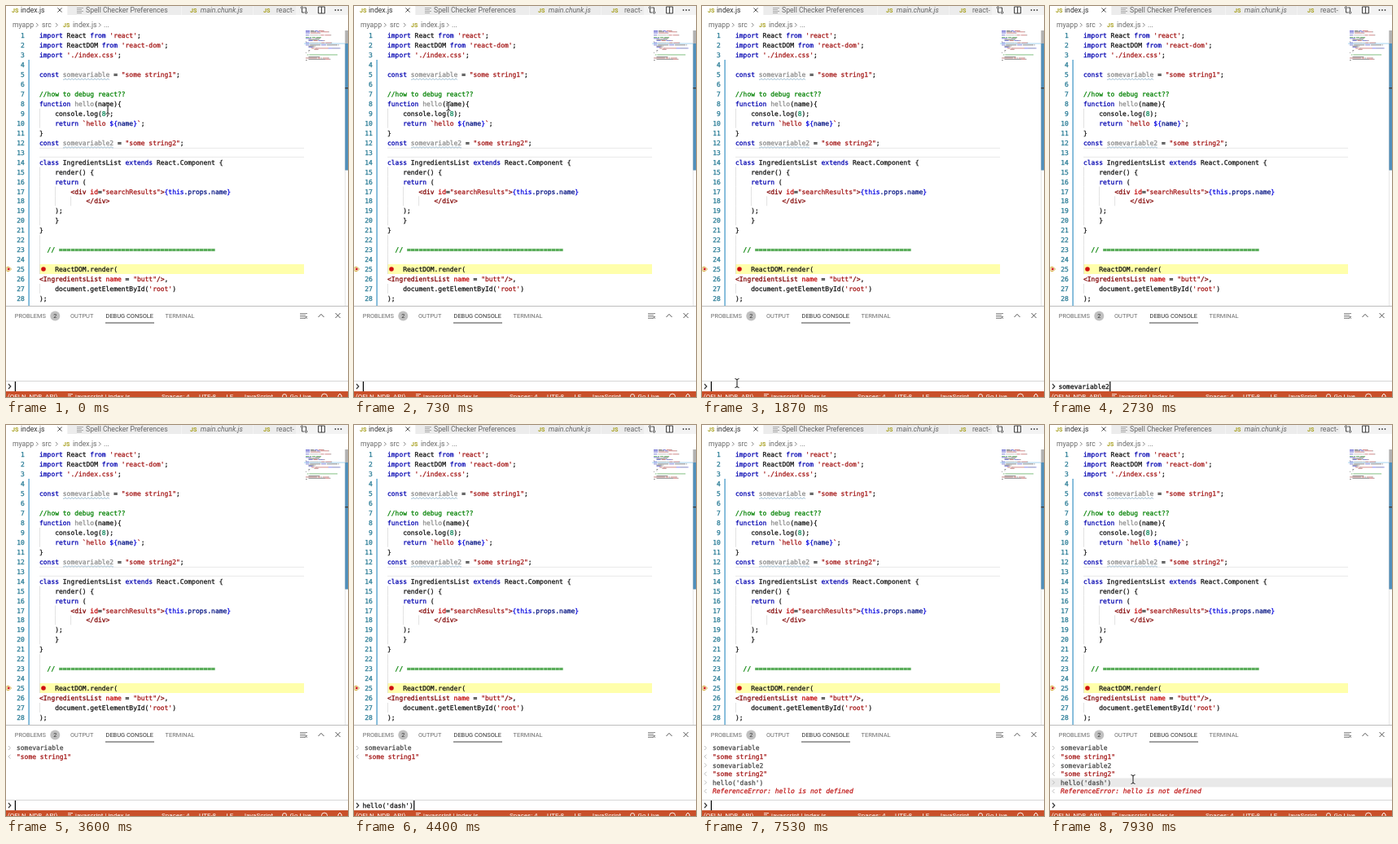
Write an HTML page with a canvas that moves like this. It is 420 px wide and 480 px high and loops after 8 s.

```html
<!DOCTYPE html>
<html lang="en">
<head>
<meta charset="utf-8">
<title>Debug console</title>
<style>
html, body { margin: 0; width: 100%; height: 100%; overflow: hidden; background: #fff; }
canvas { display: block; width: 420px; height: 480px; }
</style>
</head>
<body>
<canvas id="stage" width="420" height="480"></canvas>
<script>
const ctx = document.getElementById('stage').getContext('2d');
const LOOP = 8000;
const MONO = '7.97px "DejaVu Sans Mono", monospace';
const UI = 'Roboto, sans-serif';
const CHAR = 4.798;
const LINE = 11.95;

// ^x switches the colour of the text that follows
const INK = {
  d: '#111111', k: '#0000b0', s: '#a31515', g: '#8a8a8a', c: '#008000',
  n: '#098658', t: '#800000', a: '#c00000', b: '#0000e0', v: '#001080'
};
const CODE = [
  "^kimport^d React ^kfrom^s 'react'^d;",
  "^kimport^d ReactDOM ^kfrom^s 'react-dom'^d;",
  "^kimport^s './index.css'^d;",
  '',
  '^kconst^g somevariable^d = ^s"some string1"^d;',
  '',
  '^c//how to debug react??',
  '^kfunction^g hello^d(name){',
  '    console.log(^n8^d);',
  '    ^kreturn^s `hello ^b${^v'+'name^b}^s`^d;',
  '}',
  '^kconst^g somevariable2^d = ^s"some string2"^d;',
  '',
  '^kclass^d IngredientsList ^kextends^d React.Component {',
  '    render() {',
  '    ^kreturn^d (',
  '        ^t<div^a id^d=^s"searchResults"^t>^b{this^v.props.name^b}',
  '            ^t</div>',
  '    );',
  '    }',
  '}',
  '',
  '  ^c// ' + '='.repeat(40),
  '',
  '    ReactDOM.render(',
  '^t<IngredientsList^a name ^d= ^s"butt"^t/>^d,',
  "    document.getElementById(^s'root'^d)",
  ');'
];

const LOG = [
  [3530, 'in', 'somevariable'], [3600, 'out', '"some string1"'],
  [5330, 'in', 'somevariable2'], [5400, 'out', '"some string2"'],
  [7400, 'in', "hello('dash')"], [7470, 'err', 'ReferenceError: hello is not defined']
];
const INPUT = [
  [0, ''], [2400, "hello('dash')"], [2730, 'somevariable2'], [3200, 'somevariable'],
  [3530, ''], [4200, 'somevariable'], [4400, "hello('dash')"], [4870, 'somevariable2'],
  [5330, ''], [6200, 'somevariable2'], [6470, 'somevariable'], [6870, "hello('dash')"],
  [7400, '']
];
const CARET_OFF = [[200, 700], [1200, 1700], [2200, 2400], [4000, 4200], [5800, 6200], [7900, 8000]];
const POINTER = [
  [0, 125, 127], [70, 125, 127], [730, 116, 123], [870, 116, 123],
  [1000, 116, 123], [1800, 43, 463], [2400, 43, 463]
];

function text(str, x, y, color, font, align = 'left') {
  ctx.font = font;
  ctx.fillStyle = color;
  ctx.textAlign = align;
  ctx.fillText(str, x, y);
}

function ui(str, x, y, color, size = 8.67, style = '') {
  text(str, x, y, color, `${style} ${size}px ${UI}`);
}

// Monospace text with a hairline stroke for a slightly heavier weight
function mono(str, x, y, color, align, style = '') {
  text(str, x, y, color, `${style} ${MONO}`, align);
  ctx.strokeStyle = color;
  ctx.lineWidth = 0.25;
  ctx.strokeText(str, x, y);
}

function rect(x, y, w, h, color) {
  ctx.fillStyle = color;
  ctx.fillRect(x, y, w, h);
}

function dot(x, y, r, color) {
  ctx.fillStyle = color;
  ctx.beginPath();
  ctx.arc(x, y, r, 0, Math.PI * 2);
  ctx.fill();
}

function path(points, color, width = 1) {
  ctx.strokeStyle = color;
  ctx.lineWidth = width;
  ctx.beginPath();
  for (let i = 0; i < points.length; i += 2) ctx.lineTo(points[i], points[i + 1]);
  ctx.stroke();
}

function ring(x, y, r, color) {
  ctx.strokeStyle = color;
  ctx.lineWidth = 0.9;
  ctx.beginPath();
  ctx.arc(x, y, r, 0, Math.PI * 2);
  ctx.stroke();
}

function cross(x, y, r, color) {
  path([x - r, y - r, x + r, y + r], color);
  path([x - r, y + r, x + r, y - r], color);
}

function chevron(x, y, w, h, color, width) {
  path([x, y - h, x + w, y, x, y + h], color, width);
}

function bars(x, y, w, color) {
  for (let i = 0; i < 4; i++) rect(x, y + i * 2, w - (i % 2) * 2, 0.8, color);
}

function squiggle(x, y, w) {
  const points = [];
  for (let i = 0; i <= w; i++) points.push(x + i, y + Math.sin(i * Math.PI / 2) * 0.8);
  path(points, '#8fb4cc', 0.8);
}

function tokens(line) {
  let color = 'd', col = 0;
  const list = [];
  for (const part of line.split(/(\^\w)/)) {
    if (/^\^\w$/.test(part)) { color = part[1]; continue; }
    if (part) list.push({ str: part, color: INK[color], col });
    col += part.length;
  }
  return list;
}
const LINES = CODE.map(tokens);

// Blank lines take the indent of the line below
const INDENTS = CODE.map((line, i) => (line || CODE[i + 1]).search(/\S/));

function drawTabs() {
  const js = '#a8a020';
  rect(0, 0, 420, 11, '#f3f3f3');
  rect(0, 0, 75, 11, '#ffffff');
  rect(76, 0, 139, 11, '#ececec');
  rect(216, 0, 87, 11, '#ececec');
  rect(304, 0, 52, 11, '#ececec');
  ui('JS', 7, 8.3, js, 7.2, 'bold');
  ui('index.js', 18, 8.3, '#333333');
  cross(66, 5, 2.6, '#555555');
  bars(87, 2, 8, '#999999');
  ui('Spell Checker Preferences', 98, 8.3, '#666666');
  ui('JS', 226, 8.3, js, 7.2, 'bold');
  ui('main.chunk.js', 238.8, 8.3, '#666666', 8.67, 'italic');
  ui('JS', 316, 8.3, js, 7.2, 'bold');
  ui('react-', 332, 8.3, '#666666');

  const icon = '#424242';
  ring(363.5, 2, 1.3, icon);
  ring(368.5, 8, 1.3, icon);
  path([363.5, 3.3, 363.5, 8, 366, 8], icon);
  path([368.5, 6.7, 368.5, 2, 366, 2], icon);
  path([383.5, 1, 391.5, 1, 391.5, 9, 383.5, 9, 383.5, 1], icon);
  path([387.5, 1, 387.5, 9], icon);
  for (let i = 0; i < 3; i++) dot(404.5 + i * 3.5, 5, 0.9, icon);
}

function drawCrumbs() {
  const gray = '#6a6a6a';
  ui('myapp', 8, 26.3, gray);
  ui('src', 44, 26.3, gray);
  ui('JS', 70, 26.3, '#a8a020', 7, 'bold');
  ui('index.js', 82, 26.3, gray);
  ui('...', 120, 26.3, gray);
  for (const x of [37, 61, 114]) chevron(x, 23.3, 2.3, 2.4, gray, 0.8);
}

function drawEditor() {
  const base = n => 39.3 + (n - 1) * LINE;
  rect(41, 174, 325, 1, '#e9e9e9');
  rect(41, 185, 325, 1, '#e9e9e9');
  rect(41, 317, 325, 12, '#ffffab');
  rect(27.3, 66, 1.7, 302, '#74b3d6');

  LINES.forEach((line, i) => {
    const y = base(i + 1);
    for (let col = 0; col < INDENTS[i]; col += 4) {
      rect(41 + col * CHAR, y - 9, 0.7, LINE, '#d6d6d6');
    }
    mono(i + 1, 22.8, y, '#237893', 'right');
    for (const t of line) mono(t.str, 41 + t.col * CHAR, y, t.color);
  });
  squiggle(70, base(5) + 2.8, 57);
  squiggle(70, base(12) + 2.8, 62);

  dot(46, 323, 2.8, '#d01010');
  path([1, 320.5, 4, 320.5, 6.5, 323, 4, 325.5, 1, 325.5, 1, 320.5], '#d8b040', 1);
  dot(3.3, 323, 1.4, '#d01010');
}

function drawMinimap() {
  rect(366, 45.5, 51, 1.2, '#b5dcf3');
  ctx.globalAlpha = 0.55;
  LINES.forEach((line, i) => {
    for (const t of line) {
      for (const w of t.str.matchAll(/\S+/g)) {
        rect(368 + (t.col + w.index) * 0.87, 30 + i * 1.34, w[0].length * 0.87, 0.9, t.color);
      }
    }
  });
  ctx.globalAlpha = 1;
  rect(416, 30, 1, 338, '#e6e6e6');
  rect(416.5, 30, 3.5, 171.5, '#b2b2b2');
  rect(416.5, 46, 3.5, 155.5, '#4f8fbc');
  rect(416.5, 100, 3.5, 1.5, '#424242');
}

function drawPanel() {
  rect(0, 368, 420, 112, '#ffffff');
  rect(0, 368, 420, 1, '#bdbdbd');
  const tab = (str, x, color) => ui(str, x, 383.3, color, 7.45);
  tab('PROBLEMS', 10.7, '#6c6c6c');
  tab('OUTPUT', 79, '#6c6c6c');
  tab('DEBUG CONSOLE', 122.5, '#333333');
  tab('TERMINAL', 195.5, '#6c6c6c');
  rect(122, 388.5, 60, 1, '#424242');
  dot(60.3, 380.5, 6, '#c0c0c0');
  text('2', 60.3, 383.1, '#333333', `7.3px ${UI}`, 'center');

  const icon = '#555555';
  bars(361, 377, 9, '#707070');
  cross(368.5, 382.5, 1.3, '#707070');
  path([383.5, 382, 387, 378.3, 390.5, 382], icon);
  cross(407.5, 380, 3, icon);
}

function drawLog(t) {
  LOG.forEach(([at, kind, str], i) => {
    if (t < at) return;
    const y = 396.5 + i * 10.6;
    if (i === 4 && t >= 7800) rect(0, 433.5, 420, 11, '#e9e9e9');
    const out = kind !== 'in';
    chevron(out ? 5.5 : 3, y, out ? -2.5 : 2.5, 2.5, '#b5b5b5', 0.9);
    if (kind === 'err') mono(str, 13, y + 2.8, '#c01818', 'left', 'italic');
    else mono(str, 13, y + 2.8, out ? '#a31515' : '#4a4a4a');
  });
}

function drawInput(t) {
  const typed = INPUT.filter(([at]) => at <= t).pop()[1];
  rect(0, 460, 420, 1, '#d6d6d6');
  chevron(3, 467, 2.8, 3, '#333333', 1.2);
  mono(typed, 10.5, 469.8, '#111111');
  if (!CARET_OFF.some(([a, b]) => t >= a && t < b)) {
    rect(10.8 + typed.length * CHAR, 461, 1.2, 12, '#000000');
  }
}

function drawStatus() {
  rect(0, 473, 420, 7, '#c9502a');
  const label = (str, x) => ui(str, x, 481.8, '#ffffff', 8);
  label('(QELN_NDB_API)', 2);
  bars(76, 476, 6, '#ffffff');
  label('javascript | index.js', 85);
  label('Spaces: 4', 191);
  label('UTF-8', 237);
  label('LF', 270.5);
  label('JavaScript', 290.5);
  label('Go Live', 348.5);
  ring(342, 479, 2.5, '#ffffff');
  ring(391, 479.5, 3.5, '#ffffff');
  path([408, 481, 408, 478, 410, 476, 412, 478, 412, 481], '#ffffff');
}

function ibeam(x, y) {
  const shape = [[x - 2.5, y - 5.5, x, y - 4.5, x + 2.5, y - 5.5],
    [x, y - 4.5, x, y + 4.5], [x - 2.5, y + 5.5, x, y + 4.5, x + 2.5, y + 5.5]];
  for (const p of shape) path(p, '#ffffff', 2.2);
  for (const p of shape) path(p, '#111111', 1);
}

function drawPointer(t) {
  if (t >= 7800) return ibeam(102, 435);
  const i = POINTER.findIndex(p => p[0] > t);
  if (i < 1) return;
  const [t0, x0, y0] = POINTER[i - 1], [t1, x1, y1] = POINTER[i];
  const u = (t - t0) / (t1 - t0);
  const e = u * u * (3 - 2 * u);
  ibeam(x0 + (x1 - x0) * e, y0 + (y1 - y0) * e);
}

function frame(now) {
  const t = now % LOOP;
  rect(0, 0, 420, 480, '#ffffff');
  drawTabs();
  drawCrumbs();
  drawEditor();
  drawMinimap();
  drawPanel();
  drawLog(t);
  drawInput(t);
  drawStatus();
  drawPointer(t);
  requestAnimationFrame(frame);
}
requestAnimationFrame(frame);
</script>
</body>
</html>
```
